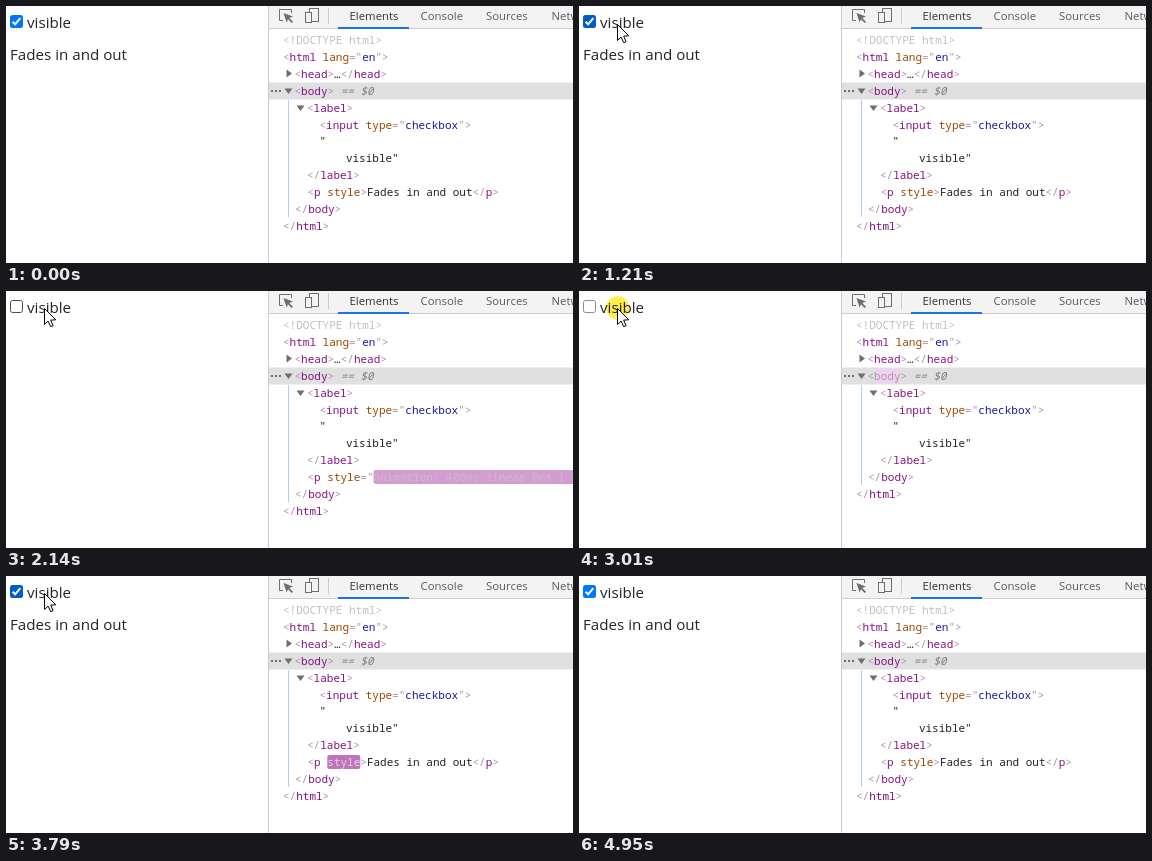
Write an HTML page with a canvas that moves like this. It is 567 px wide and 257 px high and loops after 5.26 s.

```html
<!DOCTYPE html>
<html lang="en">
<head>
<meta charset="utf-8">
<title>Fade toggle</title>
<style>
  html, body { margin: 0; width: 100%; height: 100%; overflow: hidden; background: #fff; }
  canvas { display: block; width: 567px; height: 257px; }
</style>
</head>
<body>
<canvas id="stage" width="567" height="257"></canvas>
<script>
const ctx = document.getElementById('stage').getContext('2d');
const LOOP = 5260;
const CHAR = 6.6;
const UI = '"Open Sans", "Noto Sans", sans-serif';
const MONO = '11px "Noto Sans Mono", "DejaVu Sans Mono", monospace';

// Timeline in ms
const PRESS1 = 1590, OUT = 1745, REMOVED = 2225;
const PRESS2 = 2765, IN = 3090, SETTLED = 3530;
const FADE = 400;

const TAG = [168, 148, 166], NAME = [136, 18, 128], ATTR = [153, 69, 0];
const TEXT = [34, 34, 34], DIM = [192, 192, 192];
const VALUE = [26, 26, 166];
const FLASH = [158, 54, 153], PALE = [245, 219, 244];

// Pointer path: time, x, y; the pointer is redrawn every STEP ms
const STEP = 77.5, STEP_PHASE = 4490 % STEP;
const PATH = [
  [290, 74, 192], [400, 70, 166], [560, 57, 104], [700, 46, 61], [820, 42, 45],
  [900, 40, 29], [1050, 39, 21], [1200, 38, 17], [4320, 38, 17],
  [4412, 92, 45], [4490, 283, 139], [4565, 430, 211], [4640, 520, 260]
];

const clamp = v => Math.max(0, Math.min(1, v));
const mix = (a, b, k) => a.map((v, i) => v + (b[i] - v) * k);
const rgb = (c, a = 1) => `rgba(${c.map(Math.round).join(',')},${a})`;
const within = (t, a, b) => t >= a && t < b;

// CSS "ease" curve
function ease(x) {
  let lo = 0, hi = 1, s = x;
  for (let i = 0; i < 20; i++) {
    s = (lo + hi) / 2;
    const bx = 0.75 * s * (1 - s) * (1 - s) + 0.75 * s * s * (1 - s) + s * s * s;
    if (bx < x) lo = s; else hi = s;
  }
  return 0.3 * s * (1 - s) * (1 - s) + 3 * s * s * (1 - s) + s * s * s;
}

function rect(x, y, w, h, color) {
  ctx.fillStyle = color;
  ctx.fillRect(x, y, w, h);
}

function roundRect(x, y, w, h, r) {
  ctx.beginPath();
  ctx.moveTo(x + r, y);
  ctx.arcTo(x + w, y, x + w, y + h, r);
  ctx.arcTo(x + w, y + h, x, y + h, r);
  ctx.arcTo(x, y + h, x, y, r);
  ctx.arcTo(x, y, x + w, y, r);
  ctx.closePath();
}

function poly(points, closed = true) {
  ctx.beginPath();
  points.forEach(([x, y], i) => i ? ctx.lineTo(x, y) : ctx.moveTo(x, y));
  if (closed) ctx.closePath();
}

function label(str, x, y, size, color) {
  ctx.font = `${size}px ${UI}`;
  ctx.fillStyle = color;
  ctx.fillText(str, x, y);
}

// Draws [text, colour, flash age] parts in a row; returns the end x
function code(x, y, parts) {
  ctx.font = MONO;
  for (const [str, base, age] of parts) {
    const w = str.length * CHAR;
    let color = base;
    if (age >= 0 && age < 1400) {
      const first = age < 1120;
      const k = ease(first ? age / 1120 : (age - 1120) / 280);
      color = first ? mix([255, 255, 255], TAG, k) : mix(TAG, base, k);
      ctx.fillStyle = first ? rgb(mix(FLASH, PALE, k)) : rgb(PALE, 1 - k);
      roundRect(x, y - 11, w, 14, 2);
      ctx.fill();
    }
    ctx.fillStyle = rgb(color);
    ctx.fillText(str, x, y);
    x += w;
  }
  return x;
}

const open = (name, age) => [['<', TAG], [name, NAME, age], ['>', TAG]];
const close = name => [['</', TAG], [name, NAME], ['>', TAG]];

function pointer(time) {
  const t = Math.floor((time - STEP_PHASE) / STEP) * STEP + STEP_PHASE;
  const last = PATH.length - 1;
  if (t < PATH[0][0] || t >= PATH[last][0]) return null;
  const i = PATH.findIndex((p, n) => n < last && t < PATH[n + 1][0]);
  const [t0, x0, y0] = PATH[i], [t1, x1, y1] = PATH[i + 1];
  return mix([x0, y0], [x1, y1], (t - t0) / (t1 - t0));
}

function checkbox(checked, hover, active) {
  roundRect(4, 9, 13, 13, 2.5);
  if (checked) {
    ctx.fillStyle = active ? '#3793ff' : hover ? '#005cc8' : '#0075ff';
    ctx.fill();
    poly([[6.6, 15.7], [9.2, 18.3], [14.3, 12.1]], false);
    ctx.strokeStyle = '#fff';
    ctx.lineWidth = 2;
    ctx.stroke();
  } else {
    roundRect(4.5, 9.5, 12, 12, 2);
    ctx.strokeStyle = active ? '#8d8d8d' : hover ? '#4f4f4f' : '#767676';
    ctx.lineWidth = 1;
    ctx.stroke();
  }
}

function page(t, pos) {
  const hover = pos && pos[0] < 66 && pos[1] < 33;
  const active = within(t, PRESS1, OUT) || within(t, PRESS2, IN);
  checkbox(t < OUT || t >= IN, hover, active);
  label('visible', 21, 22, 15.15, '#212529');

  const alpha = t < REMOVED ? 1 - clamp((t - OUT) / (FADE - 10)) : clamp((t - IN - 15) / FADE);
  ctx.globalAlpha = alpha;
  label('Fades in and out', 4, 54, 15.15, '#212529');
  ctx.globalAlpha = 1;

  if (active) {
    ctx.globalCompositeOperation = 'multiply';
    ctx.fillStyle = '#fff04a';
    ctx.beginPath();
    ctx.arc(38.7, 17, 11.7, 0, Math.PI * 2);
    ctx.fill();
    ctx.globalCompositeOperation = 'source-over';
  }
}

function toolbar() {
  rect(263, 0, 304, 22, '#f3f3f3');
  rect(263, 22, 304, 1, '#cccccc');
  rect(332, 21, 71, 2, '#1a73e8');
  rect(322, 2, 1, 16, '#cccccc');

  ctx.strokeStyle = ctx.fillStyle = '#6e6e6e';
  ctx.lineWidth = 1;
  poly([[277, 14.5], [273.5, 14.5], [273.5, 3.5], [285.5, 3.5], [285.5, 7]], false);
  ctx.stroke();
  poly([[277.5, 7], [287, 10.5], [283.3, 12], [287, 15.7], [285.7, 17], [282, 13.3], [280.6, 16.5]]);
  ctx.fill();

  ctx.strokeRect(303.5, 2.5, 9, 13);
  rect(299, 6, 7, 11, '#f3f3f3');
  ctx.strokeRect(299.5, 6.5, 6, 10);

  label('Elements', 343.5, 14, 11.36, '#333333');
  label('Console', 414.5, 14, 11.36, '#5a5a5a');
  label('Sources', 480, 14, 11.36, '#5a5a5a');
  label('Network', 545.5, 14, 11.36, '#5a5a5a');
}

function tree(t) {
  const rowY = n => Math.round(38 + n * 16.9);
  const hasP = t < REMOVED || t >= IN;
  const styled = within(t, OUT, REMOVED) || within(t, IN, SETTLED);
  const shift = hasP ? 0 : 1;

  rect(263, 76.5, 304, 17, '#e0e0e0');
  rect(282, 94, 1, (hasP ? 211 : 194) - 94, '#b4cbf3');

  code(277, rowY(0), [['<!DOCTYPE html>', DIM]]);
  code(277, rowY(1), [['<', TAG], ['html', NAME], [' ', TAG], ['lang', ATTR],
    ['="', TAG], ['en', VALUE], ['">', TAG]]);
  code(288.5, rowY(2), [...open('head'), ['…', TEXT], ...close('head')]);

  const bodyAge = within(t, REMOVED, IN) ? t - REMOVED : -1;
  const end = code(288.5, rowY(3), open('body', bodyAge));
  ctx.font = 'italic ' + MONO;
  ctx.fillStyle = '#7d7d7d';
  ctx.fillText(' == $0', end, rowY(3));

  code(301, rowY(4), open('label'));
  code(313.5, rowY(5), [['<', TAG], ['input', NAME], [' ', TAG], ['type', ATTR],
    ['="', TAG], ['checkbox', VALUE], ['">', TAG]]);
  code(313.5, rowY(6), [['"', TEXT]]);
  code(313.5, rowY(7), [['    visible"', TEXT]]);
  code(301, rowY(8), close('label'));

  if (hasP) {
    const start = [['<', TAG], ['p', NAME], [' ', TAG]];
    if (styled) {
      const age = t < REMOVED ? t - OUT + 10 : t - IN + 50;
      code(301.5, rowY(9), [...start, ['style', ATTR], ['="', TAG],
        ['animation: 400ms linear 0ms 1 normal', VALUE, age]]);
    } else {
      const age = t >= SETTLED ? t - SETTLED : -1;
      code(301.5, rowY(9), [...start, ['style', ATTR, age], ['>', TAG],
        ['Fades in and out', TEXT], ...close('p')]);
    }
  }
  code(289, rowY(10 - shift), close('body'));
  code(277, rowY(11 - shift), close('html'));

  ctx.fillStyle = '#6e6e6e';
  poly([[280.5, 63.5], [286, 67.5], [280.5, 71.5]]);
  ctx.fill();
  for (const [x, y] of [[278.5, 82.5], [290.5, 99.5]]) {
    poly([[x, y], [x + 8, y], [x + 4, y + 5.5]]);
    ctx.fill();
  }
  for (let i = 0; i < 3; i++) rect(265 + i * 4, 84, 2, 2, '#6e6e6e');
}

function cursor([x, y]) {
  x = Math.round(x);
  y = Math.round(y);
  ctx.lineWidth = 1;
  if (x < 122 && y > 36 && y < 61) {
    ctx.strokeStyle = '#000';
    ctx.beginPath();
    for (const dy of [-7.5, 7.5]) {
      ctx.moveTo(x - 3, y + dy);
      ctx.lineTo(x + 4, y + dy);
    }
    ctx.moveTo(x + 0.5, y - 7);
    ctx.lineTo(x + 0.5, y + 7);
    ctx.stroke();
    return;
  }
  const shape = [[0, 0], [0, 16], [3.6, 12.6], [6.2, 18.2], [8.6, 17.2], [6.2, 11.6], [11.3, 11.3]];
  poly(shape.map(([dx, dy]) => [x + 0.5 + dx, y + 0.5 + dy]));
  ctx.fillStyle = '#fff';
  ctx.fill();
  ctx.strokeStyle = '#000';
  ctx.stroke();
}

function draw(t) {
  const pos = pointer(t);
  rect(0, 0, 567, 257, '#fff');
  page(t, pos);
  rect(262, 0, 1, 257, '#cccccc');
  toolbar();
  tree(t);
  if (pos) cursor(pos);
}

const begin = performance.now();
function tick() {
  draw((performance.now() - begin) % LOOP);
  requestAnimationFrame(tick);
}
tick();
</script>
</body>
</html>
```
